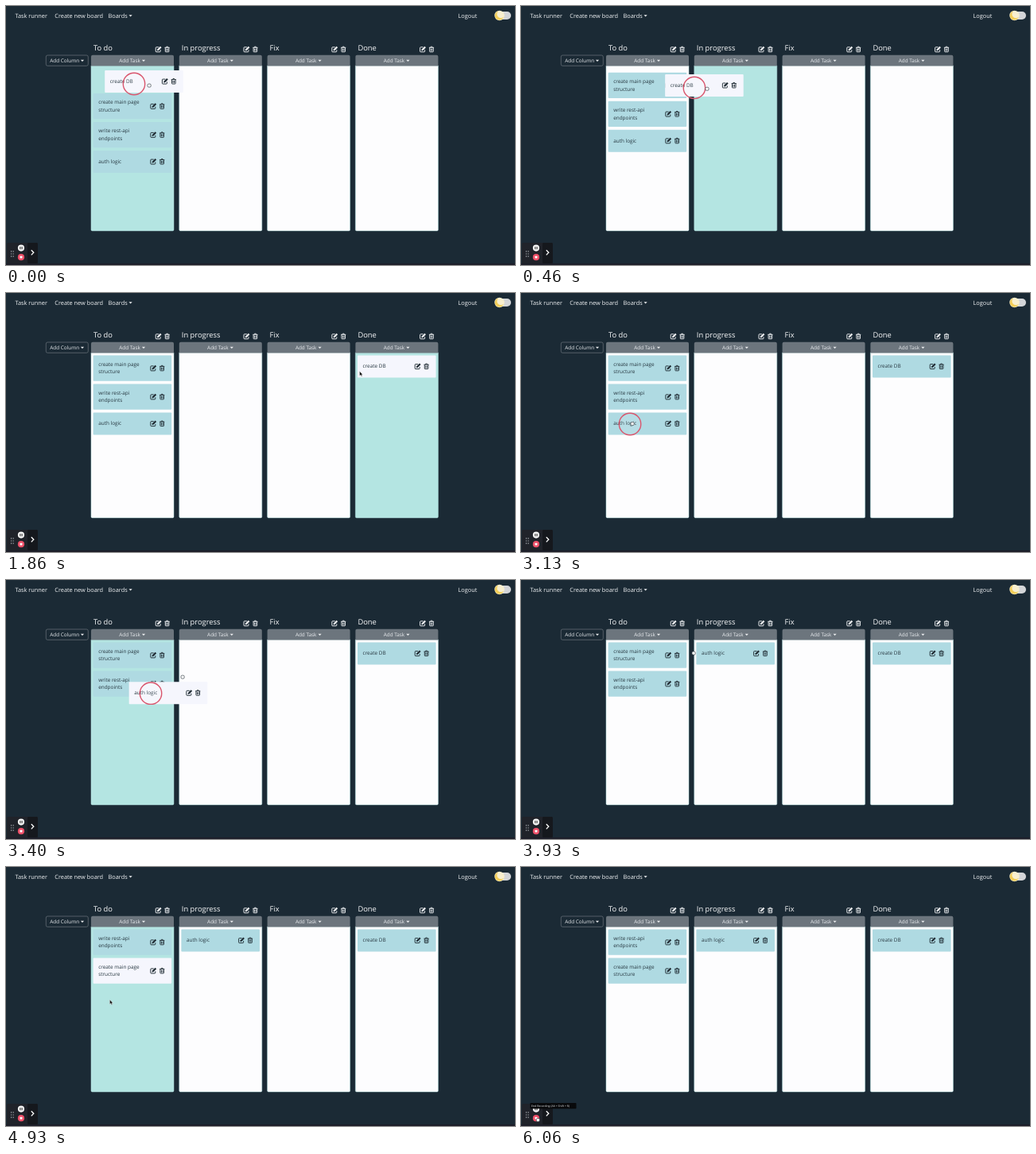
An HTML page that plays this animation: 640 px wide and 326 px high, repeating every 6260 ms.

```html
<!DOCTYPE html>
<html lang="en">
<head>
<meta charset="utf-8">
<title>Task board</title>
<style>
html, body { margin: 0; width: 100%; height: 100%; overflow: hidden; background: #1b2a35; }
svg { display: block; width: 640px; height: 326px; }
text { font-family: "Open Sans", "Noto Sans", sans-serif; font-size: 6.4px; fill: #e9ecef; text-rendering: geometricPrecision; }
.nav { font-size: 7.35px; fill: #f1f3f5; }
.title { font-size: 9.35px; font-weight: 500; fill: #f8f9fa; }
.card text { fill: #26363f; }
.card rect { fill: #afdae2; }
.card.held rect { fill: #f5f6fd; }
.body { fill: #fdfdfe; stroke: #b5e3e2; stroke-width: .5; }
.body.over { fill: #b4e5e2; }
.line { fill: none; stroke: currentColor; stroke-width: 1.8; }
</style>
</head>
<body>
<svg id="stage" viewBox="0 0 640 326">
  <defs>
    <g id="edit" transform="scale(.52) translate(-8 -8)">
      <path class="line" d="M9 3H3Q1.5 3 1.5 4.5V13Q1.5 14.5 3 14.5H11.5Q13 14.5 13 13V9.5"/>
      <path fill="currentColor" d="M5.5 8L12.6 .9L15.6 3.9L8.5 11L4.8 11.7Z"/>
    </g>
    <g id="trash" transform="scale(.5) translate(-8 -8)">
      <path class="line" d="M1.8 3.8H14.2M5.3 3.8L6.4 1.6H9.6L10.7 3.8M3.4 4V13.5Q3.4 14.7 4.6 14.7H11.4Q12.6 14.7 12.6 13.5V4M6.4 6.5V12.3M9.6 6.5V12.3"/>
    </g>
    <path id="caret" fill="#eef0f2" d="M-2.1 -1H2.1L0 1.2Z"/>
  </defs>

  <rect width="640" height="326" fill="#1b2a35"/>
  <rect y="324" width="640" height="2" fill="#1d1e29"/>

  <text class="nav" x="11.5" y="14.7">Task runner</text>
  <text class="nav" x="61.3" y="14.7">Create new board</text>
  <text class="nav" x="128.5" y="14.7">Boards</text>
  <use href="#caret" x="156.6" y="12.2"/>
  <text class="nav" x="568.5" y="14.7">Logout</text>
  <rect x="615" y="7" width="20" height="10" rx="5" fill="#d3d5d8"/>
  <circle cx="620.5" cy="12" r="6.2" fill="#f8efcf"/>
  <path d="M619 6.6A5.6 5.6 0 1 0 625.6 14A4.8 4.8 0 0 1 619 6.6Z" fill="#f3ce58"/>

  <rect x="50.3" y="62" width="53" height="13.3" rx="2" fill="none" stroke="#6c757d" stroke-width=".7"/>
  <text x="55.3" y="70.8">Add Column</text>
  <use href="#caret" x="96" y="68.7"/>

  <g id="columns"></g>
  <g id="cards"></g>

  <rect x="1" y="298" width="39" height="26" rx="1.5" fill="#20232a"/>
  <rect x="27" y="298" width="13" height="26" rx="1.5" fill="#15181d"/>
  <path d="M6.6 308.3V316M9.2 308.3V316" stroke="#aeb2b8" stroke-width="1.2" stroke-dasharray="1.2 1.9"/>
  <circle cx="19" cy="304.6" r="4.1" fill="#fafafa"/>
  <path d="M17.9 302.9V306.3M20.1 302.9V306.3" stroke="#222" stroke-width="1"/>
  <circle cx="19" cy="316.2" r="4.1" fill="#ee5069"/>
  <rect x="17.6" y="314.8" width="2.8" height="2.8" rx=".4" fill="#fff"/>
  <path d="M31.8 307.2L34.8 310.3L31.8 313.4" fill="none" stroke="#fff" stroke-width="1.3"/>
  <g id="tip">
    <rect x="11.5" y="297" width="58" height="7.3" rx=".8" fill="#08090b"/>
    <text x="13" y="302" style="font-size:3.5px">End Recording (Alt + Shift + R)</text>
  </g>

  <circle id="ring" r="13.7" fill="#fff" fill-opacity=".1" stroke="#d9566d" stroke-width="1.4"/>
  <path id="arrow" d="M0 0V5.6L1.4 4.5L2.3 6.4L3.3 5.9L2.4 4.1H4Z" fill="#111" stroke="#fff" stroke-width=".4"/>
  <rect id="hand" x="-2" y="-1.9" width="4.2" height="4" rx="1.4" fill="#fff" stroke="#39434a" stroke-width=".7"/>
</svg>

<script>
const LOOP = 6260, LAG = 130, STEP = 110.8, TOP = 78.5, SINGLE = 31.5, DOUBLE = 36;
const $ = id => document.getElementById(id);
const mix = (a, b, k) => a + (b - a) * k;
const ramp = (t, a, b) => Math.min(1, Math.max(0, (t - a) / (b - a)));
const ease = (t, a, b) => 1 - (1 - ramp(t, a, b)) ** 3;
const move = (el, [x, y]) => el.setAttribute('transform', `translate(${x} ${y})`);
const show = (el, on) => el.setAttribute('visibility', on ? 'visible' : 'hidden');
const slotX = col => 109.6 + col * STEP;
const icons = (x, y) => `<use href="#edit" x="${x}" y="${y}"/><use href="#trash" x="${x + 11}" y="${y}"/>`;

$('columns').innerHTML = ['To do', 'In progress', 'Fix', 'Done'].map((name, i) => `
  <g transform="translate(${107 + i * STEP} 0)" color="#f1f3f5">
    <text class="title" x="3" y="56.4">${name}</text>${icons(84.6, 54.4)}
    <path class="body" d="M0 75H104V281.5Q104 283 102.5 283H1.5Q0 283 0 281.5Z"/>
    <path d="M0 75.6V63.8Q0 61.8 2 61.8H102Q104 61.8 104 63.8V75.6Z" fill="#6c757d"/>
    <text x="35.3" y="70.8">Add Task</text><use href="#caret" x="66" y="68.7"/>
  </g>`).join('');
const bodies = [...document.querySelectorAll('.body')];

const tasks = [['create DB'], ['create main page', 'structure'], ['write rest-api', 'endpoints'], ['auth logic']];
$('cards').innerHTML = tasks.map(lines => {
  const two = lines.length > 1;
  const label = lines.map((s, i) => `<text x="6.6" y="${(two ? 13.4 : 15.8) + i * 9.5}">${s}</text>`).join('');
  return `<g class="card" color="#1f2b33"><rect width="98.6" height="${two ? 32.3 : 28}" rx="1"/>${label}${icons(75.6, two ? 16 : 13.7)}</g>`;
}).join('');
const cards = [...document.querySelectorAll('.card')];

// Pointer path: time, x, y
const path = [
  [-130, 161, 98], [0, 180, 100], [370, 232, 104], [660, 250, 106], [860, 256, 106], [1000, 297.5, 108.5],
  [1130, 351, 116], [1330, 462, 113], [1460, 476, 110], [1660, 474, 107], [1860, 432, 95], [2200, 236, 130],
  [2460, 160, 158], [2600, 146, 163], [2860, 137, 165], [3000, 137, 165], [3130, 139, 165], [3400, 222, 122],
  [3560, 247, 98], [3730, 246, 94], [3930, 218, 92], [4200, 138, 94], [4400, 131, 95], [4600, 131, 130],
  [4760, 131, 155], [4930, 130.5, 167], [5130, 127, 173], [5500, 60, 262], [5800, 22, 316], [6060, 21, 319]
];
function pointer(t) {
  const i = path.findIndex(p => p[0] >= t);
  if (i < 0) return path.at(-1).slice(1);
  if (!i) return path[0].slice(1);
  const [a, b] = [path[i - 1], path[i]], k = ramp(t, a[0], b[0]);
  return [mix(a[1], b[1], k), mix(a[2], b[2], k)];
}

const drags = [
  { card: 0, grab: [36.8, 17], from: -200, release: 1560, end: 1920, col: 3, y: TOP },
  { card: 3, grab: [27.4, 14.5], from: 3080, release: 3640, end: 3880, col: 1, y: TOP },
  { card: 1, grab: [21.4, 16.5], from: 4380, release: 4720, end: 4990, col: 0, y: TOP + DOUBLE }
];

function draw(t) {
  const close = SINGLE * (1 - ease(t, 310, 510)), swap = ease(t, 4560, 4760);
  const places = [
    [slotX(3), TOP],
    [slotX(0), t < 4380 ? TOP + close : TOP + DOUBLE],
    [slotX(0), TOP + DOUBLE * (1 - swap) + close],
    t < 3640 ? [slotX(0), TOP + 2 * DOUBLE + close] : [slotX(1), TOP]
  ];
  const drag = drags.find(d => t >= d.from && t < d.end);
  const trail = pointer(t - LAG);
  let over = -1;
  if (drag) {
    const start = pointer(Math.min(t, drag.release) - LAG).map((v, i) => v - drag.grab[i]);
    const k = ease(t, drag.release, drag.end - 80);
    places[drag.card] = [mix(start[0], slotX(drag.col), k), mix(start[1], drag.y, k)];
    over = t > drag.release ? drag.col
      : bodies.findIndex((_, i) => Math.abs(places[drag.card][0] - slotX(i)) < 53);
    $('cards').append(cards[drag.card]);
  }
  cards.forEach((c, i) => {
    move(c, places[i]);
    c.classList.toggle('held', !!drag && drag.card === i && (t > drag.from + 70));
  });
  bodies.forEach((b, i) => b.classList.toggle('over', i === over && t > drag.from + 70));

  const hand = t < 1560 || (t > 2300 && t < 4740) || t > 5780;
  for (const id of ['arrow', 'hand']) {
    move($(id), pointer(t));
    show($(id), hand === (id === 'hand'));
  }
  move($('ring'), trail);
  show($('ring'), drag && t < drag.release);
  show($('tip'), t > 5980);
}

// The picture advances fifteen times a second.
function tick() {
  const t = performance.now() % LOOP;
  draw(Math.floor((t + 5) * .015) / .015);
  requestAnimationFrame(tick);
}
tick();
</script>
</body>
</html>
```
